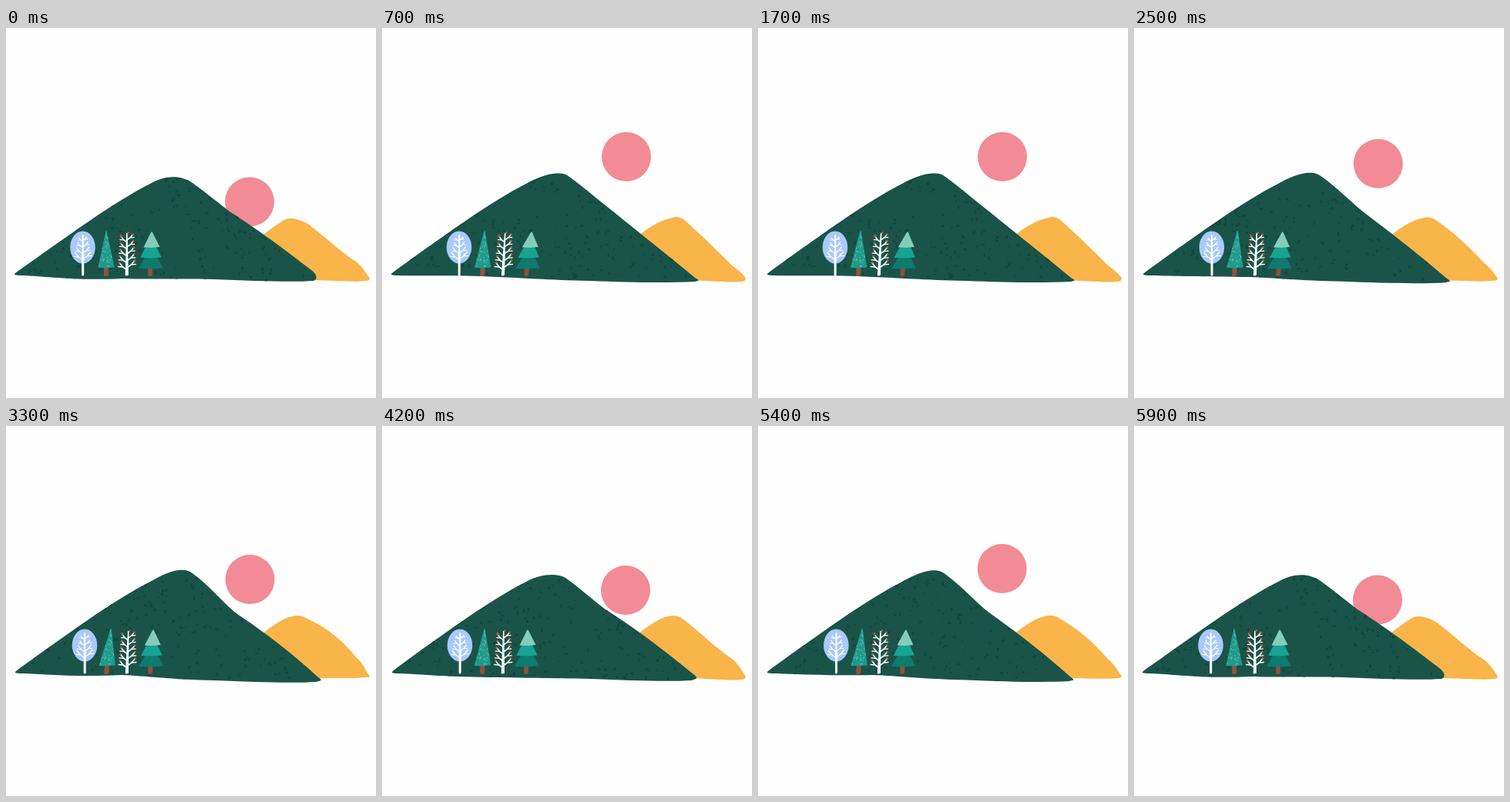
An HTML page with a canvas that plays this animation: 480x480 px, repeating every 6 s.

```html
<!DOCTYPE html>
<html lang="en">
<head>
<meta charset="utf-8">
<title>Sunrise behind the hills</title>
<style>
  html, body { margin: 0; height: 100%; overflow: hidden; background: #fefefe; }
  canvas { display: block; }
</style>
</head>
<body>
<canvas id="stage" width="480" height="480"></canvas>
<script>
const ctx = document.getElementById('stage').getContext('2d');
const STEP = 100;

// Key poses; drawings between them are blended
const greenPoses = [
  [12, 226, 190, 242, 201, 290, 238, 396, 314, 399, 328, 326, 325, 328],
  [14, 228, 191, 238, 197, 290, 238, 404, 322, 402, 330, 328, 326, 326],
  [13, 230, 180, 243, 192, 300, 244, 405, 326, 402, 332, 330, 323, 326],
  [13, 232, 183, 243, 193, 300, 238, 406, 324, 406, 329, 328, 323, 320]
];
const yellowPoses = [
  [363, 393, 255, 420, 276, 440, 295, 303, 328],
  [367, 390, 250, 415, 270, 437, 291, 302, 329],
  [367, 391, 250, 425, 266, 443, 286, 300, 326],
  [370, 391, 248, 415, 269, 440, 294, 308, 329]
];
// Horizontal lean of sun, round tree, pine, bare tree and fir
const leanPoses = [[0, 0, 0, 0, 0], [0, 1.5, 3, 1, 0], [.5, 2.5, 6, 2, 2], [1, .5, 3, 3, 5]];

// One entry per drawing in the cycle
const sunY = [225.5, 220, 213, 199, 185, 176, 167, 167, 149, 225.5];
const pose = [0, .5, 1, 2, 2.3, 2.6, 2.8, 3, 2.7, 0];

function blend(poses, p) {
  const i = Math.min(Math.floor(p), 2), k = p - i;
  return poses[i].map((v, n) => v + (poses[i + 1][n] - v) * k);
}

function random(seed) {
  return () => (seed = (seed * 16807) % 2147483647) / 2147483647;
}

function greenHill([left, cx, cy, sx, sy, mx, my, tx, ty, bx, by, low, near, foot]) {
  return new Path2D(`M${left} 318 C30 305 85 266 110 249 S165 213 187 202
    C206 191 ${cx} ${cy} ${sx} ${sy}
    C${sx + 21} ${sy + 15} ${mx - 16} ${my - 12} ${mx} ${my}
    C334 266 375 298 ${tx} ${ty}
    C${tx + 7} ${ty + 5} ${bx + 6} ${by - 2} ${bx} ${by}
    C370 ${by + 2} 320 ${low + 2} 270 ${low}
    C215 ${low - 1} 180 ${near + 1} 150 ${near}
    C90 ${foot} 50 322 22 321
    C${left - 2} 321 ${left - 2} 320 ${left} 318Z`);
}

function yellowHill([px, sx, sy, qx, qy, vx, vy, ry, base]) {
  return new Path2D(`M320 280 C338 264 355 252 ${px} 248
    C${px + 10} 245 ${sx - 8} ${sy - 5} ${sx} ${sy}
    C${qx} ${qy} ${vx} ${vy} 454 ${ry}
    C462 ${ry + 6} 467 318 470 322
    C474 327 470 ${base} 466 ${base}
    C450 ${base + 2} 425 327 380 327Z`);
}

function fill(path, color) {
  ctx.fillStyle = color;
  ctx.fill(path);
}

function oval(color, x, y, rx, ry = rx, turn = 0) {
  ctx.fillStyle = color;
  ctx.beginPath();
  ctx.ellipse(x, y, rx, ry, turn, 0, 7);
  ctx.fill();
}

// Trapezium centred on x, with half widths at top and bottom
function taper(color, x, top, halfTop, bottom, half) {
  fill(new Path2D(`M${x - halfTop} ${top}H${x + halfTop}L${x + half} ${bottom}
    L${x} ${bottom + 1}L${x - half} ${bottom + .5}Z`), color);
}

function line(width, ...pts) {
  ctx.lineWidth = width;
  ctx.stroke(new Path2D('M' + pts.join(' ')));
}

// Draws with the top shifted by `dx` while the foot stays put
function swayed(dx, paint) {
  ctx.save();
  ctx.transform(1, 0, -dx / 58, 1, dx * 322 / 58, 0);
  paint();
  ctx.restore();
}

function speckles(path, seed) {
  const rnd = random(seed);
  ctx.save();
  ctx.clip(path);
  for (let i = 0; i < 250; i++) {
    const x = 30 + 365 * rnd(), y = 195 + 133 * rnd();
    oval('#14463c', x, y, 1 + 1.8 * rnd(), .8 + 1.1 * rnd(), 3 * rnd());
  }
  ctx.restore();
}

function branch(x, y, side, len, width) {
  const kneeX = x + side * len * .55, kneeY = y - len * .4;
  const tipX = x + side * len, tipY = y - len * .95;
  line(width, x, y, kneeX, kneeY, tipX, tipY);
  line(width * .8, kneeX, kneeY, tipX + side * 1.5, tipY + len * .5);
  return [tipX, tipY];
}

function roundTree() {
  oval('#a9c9fb', 99.5, 284.5, 16.3, 21);
  line(3, 99.7, 320, 99.7, 292);
  line(2, 99.7, 295, 99.7, 269);
  for (let i = 0; i < 4; i++)
    for (const side of [-1, 1]) branch(99.7, 301 - 8 * i - (side > 0), side, 10 - 1.7 * i, 1.3);
}

function pine() {
  taper('#935040', 130, 309, 3, 321, 3);
  taper('#1f9a8c', 130, 263, .6, 310.5, 10.7);
  const rnd = random(77);
  for (let i = 0; i < 42; i++) {
    const d = Math.sqrt(rnd());
    oval('#7cc9b8', 130 + (rnd() - .5) * 19 * d, 265 + 44 * d, .65);
  }
}

function bareTree() {
  taper('#fff', 156.8, 266, .7, 320.5, 2.1);
  const tips = [];
  for (let i = 0; i < 5; i++)
    for (const side of [-1, 1]) tips.push(branch(157, 312.5 - 9 * i - side * 1.5, side, 10 - .6 * i, 1.6));
  tips.push([158.5, 265.5], [149, 269]);
  tips.forEach(([x, y]) => oval('#dc4c50', x, y, 1.3));
}

function fir() {
  taper('#935040', 187, 311, 3, 321, 2.7);
  taper('#0f7a6e', 188, 296, 7, 311.5, 16);
  taper('#17a393', 188, 283, 6.5, 297.5, 13.7);
  taper('#86cdb9', 189, 264.5, .6, 284, 10.5);
}

function draw(phase) {
  const p = pose[phase];
  const [sun, round, pineLean, bare, firLean] = blend(leanPoses, p);
  ctx.fillStyle = '#fefefe';
  ctx.fillRect(0, 0, 480, 480);
  ctx.strokeStyle = '#fff';
  ctx.lineCap = ctx.lineJoin = 'round';

  oval('#f28b96', 316 + sun, sunY[phase], 32);
  fill(yellowHill(blend(yellowPoses, p)), '#f9b44a');
  const hill = greenHill(blend(greenPoses, p));
  fill(hill, '#1a5448');
  speckles(hill, 311 + 97 * (phase % 9));

  ctx.save();
  ctx.translate(round, 0);
  roundTree();
  ctx.restore();
  swayed(pineLean, pine);
  swayed(bare, bareTree);
  swayed(firLean, fir);
}

function tick() {
  draw(Math.floor(performance.now() / STEP) % sunY.length);
  requestAnimationFrame(tick);
}
tick();
</script>
</body>
</html>
```
